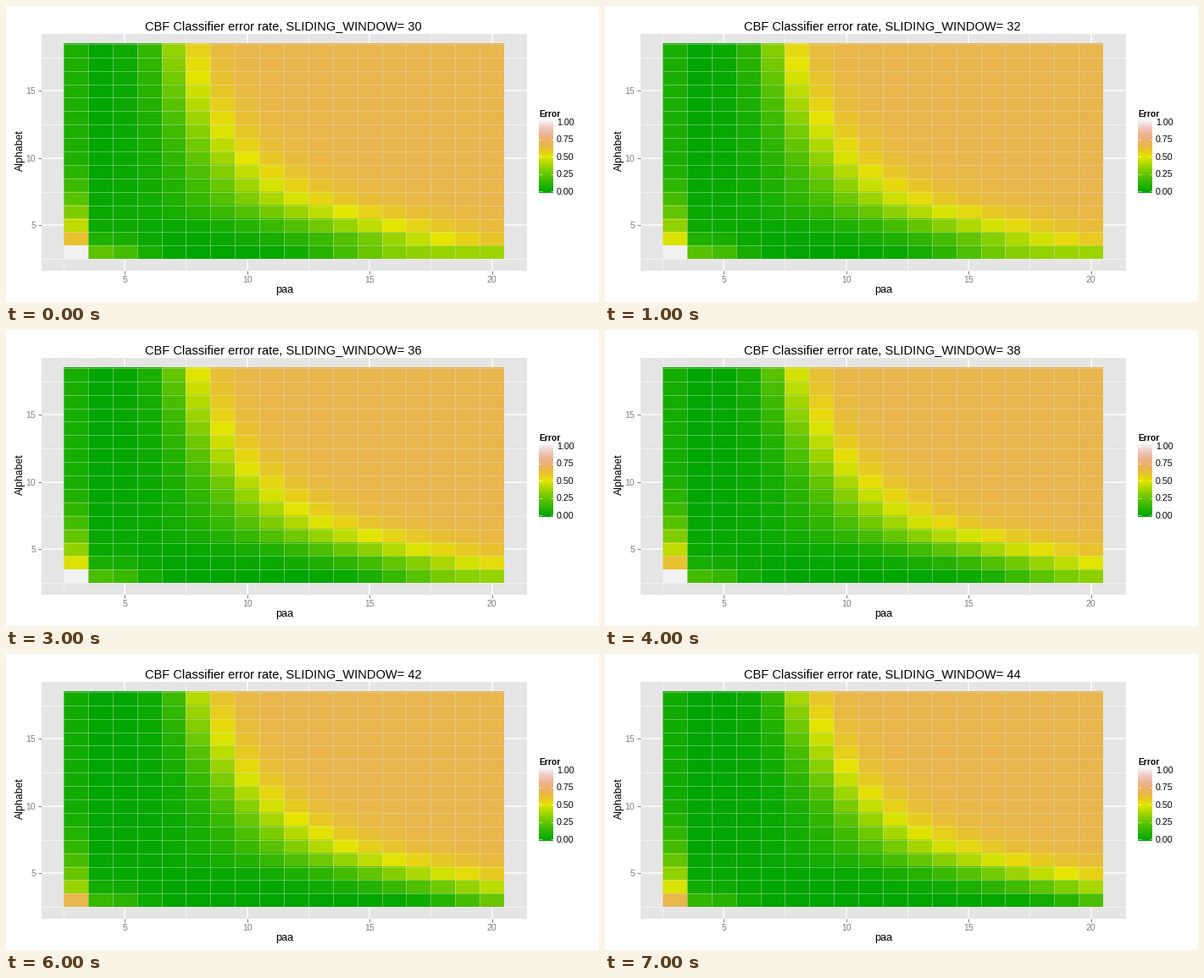
Recreate the animation shown at these times as a matplotlib script. Size 700 px wide and 350 px high, loop 8000 ms.

```python
import numpy as np
import matplotlib.pyplot as plt
from matplotlib.animation import FuncAnimation
from matplotlib.colors import hsv_to_rgb
from matplotlib.patches import Rectangle

W, H, DPI = 700, 350, 100
PX = 72 / DPI
LEFT, RIGHT, TOP, BOTTOM = 68, 588, 44.83, 299.23
PANEL = (42, 33, 573, 280)
PAA = np.arange(3, 21)
ALPHABET = np.arange(3, 19)
GREY = "#7f7f7f"
CHANCE = 2 / 3


def terrain(v):
    """Green to yellow to near white, for errors from 0 to 1."""
    v = np.asarray(v, float)
    t = np.clip(2 * v, 0, 1)
    u = np.clip(2 * v - 1, 0, 1)
    hue = (4 - 2 * t - 2 * u) / 12
    value = 0.65 + 0.25 * t + 0.05 * u
    return hsv_to_rgb(np.stack([hue, 1 - u, value], axis=-1))


def errors(window):
    """Error rate for every alphabet (rows) and paa (columns)."""
    grow = window - 30
    fade = 1 - grow / 14
    a = ALPHABET[:, None]

    # hyperbolic front where the error reaches 0.5, rising to chance level
    reach = 52 - 0.2 * a + 1.05 * grow + 5 * np.exp(-(a - 5.4) ** 2)
    half = 5 + reach / a
    slope = np.maximum(0.46, (84 + 2.4 * grow) / half**2)
    grid = CHANCE / (1 + np.exp(-slope * (PAA - half)) / 3)

    # the smallest alphabet levels off early
    grid[0] = 0.37 / (1 + np.exp(-0.9 * (PAA - 14 - 0.42 * grow)))

    # coarse settings at the lower left
    spill = (0.14 + 0.1 * fade) * np.exp(-((PAA - 4.2) / 1.6) ** 2)
    grid += spill * np.exp(3 - a)
    wobble = 1 + 0.25 * np.cos(np.pi * grow / 4)
    grid[:, 0] = np.maximum(0.05 + 0.03 * fade,
                            0.48 * wobble * 0.72 ** (ALPHABET - 4.0))
    grid[0, 0] = 1 if window < 41 else CHANCE
    return np.clip(grid, 0, 1)


def px(paa):
    return LEFT + (paa - 2.5) * (RIGHT - LEFT) / len(PAA)


def py(alphabet):
    return BOTTOM - (alphabet - 2.5) * (BOTTOM - TOP) / len(ALPHABET)


fig = plt.figure(figsize=(W / DPI, H / DPI), dpi=DPI, facecolor="white")
ax = fig.add_axes([0, 0, 1, 1])
ax.axis("off")


def line(x, y, color, width=1, z=1, **kw):
    ax.plot(x, y, color=color, lw=width * PX, zorder=z, solid_capstyle="butt", **kw)


def label(x, y, s, size, color="black", ha="center", va="baseline", **kw):
    return ax.text(x, y, s, fontsize=size * PX, color=color, ha=ha, va=va,
                   family="Liberation Sans", **kw)


def grid_lines(start, color, width):
    x0, y0, w, h = PANEL
    for v in np.arange(start, 21, 5):
        line([px(v)] * 2, [y0, y0 + h], color, width)
        if v < 18:
            line([x0, x0 + w], [py(v)] * 2, color, width)


# panel, grid and ticks
ax.add_patch(Rectangle(PANEL[:2], PANEL[2], PANEL[3], fc="#e5e5e5", lw=0, zorder=0))
grid_lines(2.5, "#f2f2f2", 1)
grid_lines(5, "white", 1.5)
for v in (5, 10, 15, 20):
    line([px(v)] * 2, [313, 317], GREY)
    label(px(v), 327, str(v), 10.5, GREY)
    if v < 20:
        line([38, 42], [py(v)] * 2, GREY)
        label(35, py(v) + 4, str(v), 10.5, GREY, ha="right")

# tiles and their thin borders
tiles = ax.imshow(terrain(errors(30)), extent=(LEFT, RIGHT, BOTTOM, TOP),
                  origin="lower", interpolation="nearest", aspect="auto", zorder=2)
for v in np.arange(2.5, 21):
    line([px(v)] * 2, [TOP, BOTTOM], "#e5e5e5", z=3, alpha=0.38)
for v in np.arange(2.5, 19):
    line([LEFT, RIGHT], [py(v)] * 2, "#e5e5e5", z=3, alpha=0.38)

# axis names
label(328.5, 339, "paa", 12.8)
label(17, 170.5, "Alphabet", 12.2, va="center", rotation=90)

# colour key
label(629, 131, "Error", 10.3, ha="left", weight="bold")
ax.imshow(terrain(np.linspace(0, 1, 86))[:, None], extent=(629, 646, 221, 135),
          origin="lower", aspect="auto", zorder=2)
for v in np.linspace(0, 1, 5):
    y = 219.3 - 81.8 * v
    for x in (629, 642.5):
        line([x, x + 3.5], [y, y], "white", z=3, alpha=0.6)
    label(650, y + 3.5, f"{v:.2f}", 10.6, ha="left")

title = label(164, 28.5, "", 14.65, ha="left")
ax.set_xlim(0, W)
ax.set_ylim(H, 0)


def update(i):
    window = 30 + 2 * i
    tiles.set_data(terrain(errors(window)))
    title.set_text(f"CBF Classifier error rate, SLIDING_WINDOW= {window}")
    return tiles, title


anim = FuncAnimation(fig, update, frames=8, interval=1000, repeat=True, repeat_delay=0)
plt.show()
```
